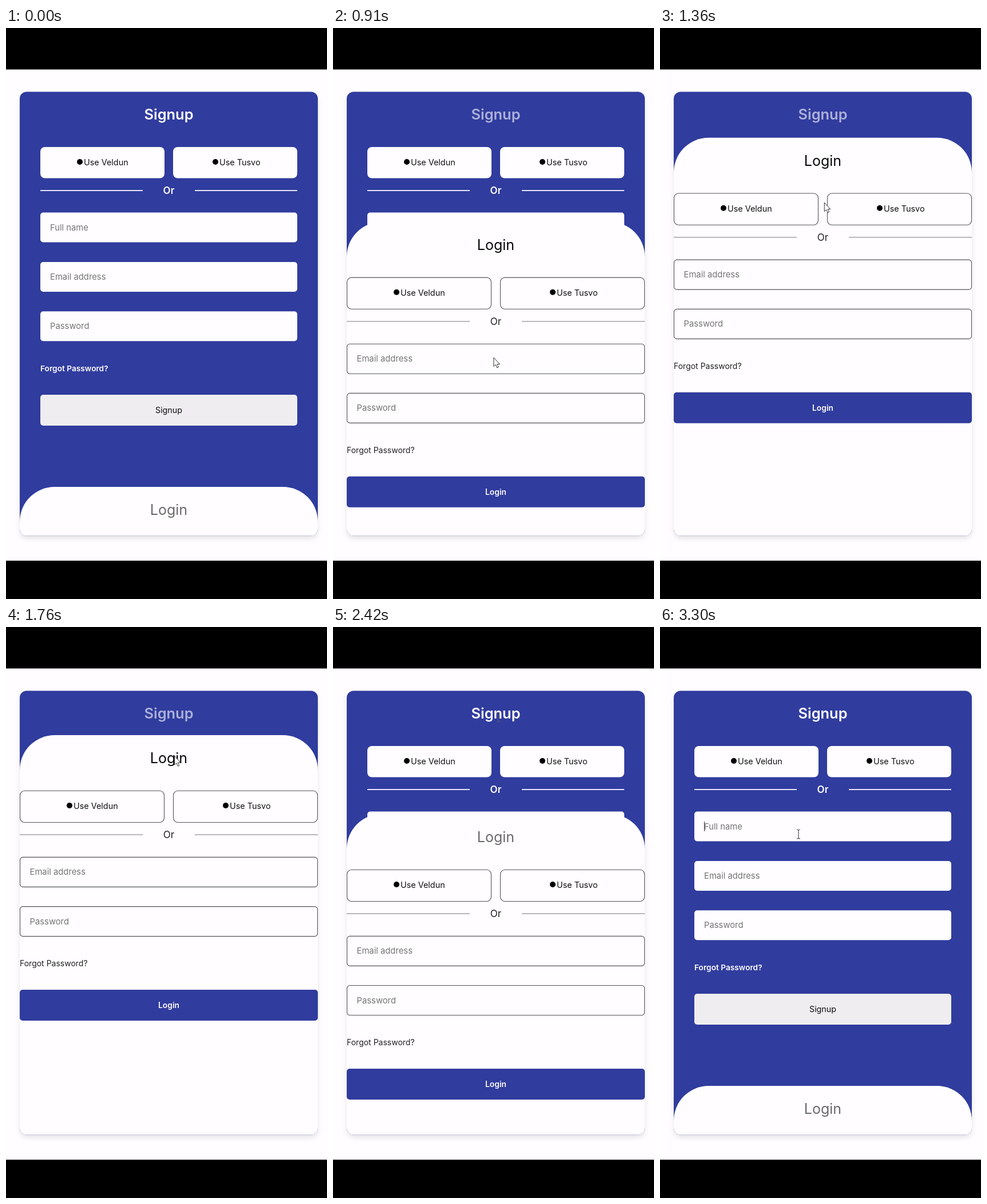
An HTML page for the animation above (3.33 s loop, 561 by 998 pixels).

```html
<!DOCTYPE html>
<html lang="en">
<head>
<meta charset="utf-8">
<title>Signup and login card</title>
<style>
  html, body { margin: 0; width: 100%; height: 100%; overflow: hidden; background: #fffdff; }
  svg { display: block; width: 100%; height: 100%; font-family: Inter, "Open Sans", sans-serif; }
  .shadow { filter: drop-shadow(0 5px 5px rgba(0, 0, 0, .11)); }
</style>
</head>
<body>
<svg id="stage" viewBox="0 0 561 998"></svg>
<script>
const LOOP = 3330;
const SLIDE = 990, OPEN = 459, CLOSE = 2254;   // panel slide length and the two clicks
const LOW = 802, HIGH = 189;                   // panel top, closed and open
const BLUE = '#303c9e', WHITE = '#fffdff', HINT = '#757575';

const text = (x, y, size, fill, str, extra = '') =>
  `<text x="${x}" y="${y}" font-size="${size}" fill="${fill}" ${extra}>${str}</text>`;
const mid = (y, size, fill, str, weight = 400, id = '') =>
  text(284.5, y, size, fill, str, `text-anchor="middle" font-weight="${weight}" id="${id}"`);
const box = (x, y, w, h, r, style) =>
  `<rect x="${x}" y="${y}" width="${w}" height="${h}" rx="${r}" ${style}/>`;
const rule = (x1, x2, y, style) => `<path d="M${x1} ${y}H${x2}" ${style}/>`;
const provider = (x, y, name) =>
  `<circle cx="${x + 5}" cy="${y - 6}" r="5"/>` + text(x + 12, y, 14.4, '#111', 'Use ' + name);
const field = (x, y, w, hint, style) =>
  box(x, y, w, 52, 5, style) + text(x + 17, y + 31, 14.8, HINT, hint);

const plain = `fill="${WHITE}"`;
const outline = `fill="${WHITE}" stroke="#55535a" stroke-width="1.1"`;
const pale = `stroke="${WHITE}" stroke-width="1.7"`;
const grey = 'stroke="#a3a1a6" stroke-width="1.4"';

const signup =
  mid(160, 25.4, WHITE, 'Signup', 600, 'signupTitle') +
  box(60, 208, 217, 54.5, 8, plain) + provider(124, 240, 'Veldun') +
  box(292, 208, 217, 54.5, 8, plain) + provider(361, 240, 'Tusvo') +
  rule(60, 239, 284.2, pale) + rule(330, 509, 284.2, pale) + mid(290, 17, WHITE, 'Or', 600) +
  field(60, 322.5, 449, 'Full name', plain) +
  field(60, 409, 449, 'Email address', plain) +
  field(60, 495.2, 449, 'Password', plain) +
  text(60, 600, 13.7, WHITE, 'Forgot Password?', 'font-weight="600"') +
  box(60, 641, 449, 54, 5, 'fill="#efedef"') + mid(672.5, 14.3, '#111', 'Signup') +
  '<path id="caret" d="M77.5 340V357" stroke="#333"/>';

const login =
  box(24, 0, 521, 900, 61, plain) +
  mid(49, 25, '#080808', 'Login', 400, 'loginTitle') +
  box(24.5, 97.3, 252, 55.2, 8, outline) + provider(106, 129, 'Veldun') +
  box(292.5, 97.3, 252, 55.2, 8, outline) + provider(379, 129, 'Tusvo') +
  rule(24, 239, 174, grey) + rule(330, 545, 174, grey) + mid(180, 17, '#222', 'Or') +
  field(24.5, 213.4, 520, 'Email address', outline) +
  field(24.5, 299.6, 520, 'Password', outline) +
  text(24, 404, 14, '#222', 'Forgot Password?') +
  box(24, 445, 521, 54, 5, `fill="${BLUE}"`) + mid(477, 13.8, WHITE, 'Login', 600);

const shapes = {
  arrow: '<path d="M.5 .5V16L4 12.8 6.3 18.3 8.8 17.2 6.5 12H11Z" fill="#fff" stroke="#333"/>',
  beam: '<path d="M-3-8Q0-8 0-6Q0-8 3-8M0-6V6M-3 8Q0 8 0 6Q0 8 3 8" fill="none" stroke="#55535a" stroke-width="1.2"/>',
  hand: '<path d="M0 1.5Q1.6-1 3 1.5V8Q5 6.5 6 8.6 8 7.5 8.8 9.6 11 9 11 11.5V15Q11 18 9 20V22H1.5V20L-4 13.5Q-4.5 10.5-2 11.5L0 13.5Z" fill="#fff" stroke="#222" stroke-width="1.1"/>'
};

const stage = document.getElementById('stage');
stage.innerHTML =
  '<clipPath id="card">' + box(24, 111.5, 521, 776, 12, '') + '</clipPath>' +
  box(0, 0, 561, 998, 0, plain) +
  box(24.5, 112, 520, 775, 12, `fill="${WHITE}" class="shadow"`) +
  '<g clip-path="url(#card)">' + box(24, 111, 521, 777, 0, `fill="${BLUE}"`) +
  signup + '<g id="panel">' + login + '</g></g>' +
  box(0, 0, 561, 72.5, 0, '') + box(0, 931, 561, 67, 0, '') +
  '<g id="pointer">' +
  Object.entries(shapes).map(([k, s]) => `<g id="${k}">${s}</g>`).join('') + '</g>';

const $ = id => document.getElementById(id);

// Pointer stops: time, x, y
const path = [
  [180, 296, 856], [440, 280, 850], [640, 276, 866], [1150, 284, 335], [1760, 294, 225],
  [2180, 289, 158], [2420, 289, 158], [2700, 296, 269], [3150, 242, 362], [LOOP, 242, 362]
];
// Pointer shape from the given time on
const looks = [[0, ''], [180, 'hand'], [540, 'arrow'], [2060, 'beam'],
               [2500, 'hand'], [2790, 'arrow'], [2910, 'beam']];

// The standard CSS "ease" curve
function ease(p) {
  if (p <= 0) return 0;
  if (p >= 1) return 1;
  const curve = (a, b, u) => 3 * a * u * (1 - u) ** 2 + 3 * b * u * u * (1 - u) + u ** 3;
  let lo = 0, hi = 1;
  for (let i = 0; i < 24; i++) {
    const u = (lo + hi) / 2;
    if (curve(.25, .25, u) < p) lo = u; else hi = u;
  }
  return curve(.1, 1, lo);
}

function pointerAt(t) {
  if (t <= path[0][0]) return path[0].slice(1);
  const i = path.findIndex(p => p[0] >= t);
  const [t0, x0, y0] = path[i - 1], [t1, x1, y1] = path[i];
  const k = (t - t0) / (t1 - t0), s = k * k * (3 - 2 * k);
  return [x0 + (x1 - x0) * s, y0 + (y1 - y0) * s];
}

function draw(t) {
  const shown = ease((t - OPEN) / SLIDE) - ease((t - CLOSE) / SLIDE);
  const open = t >= OPEN && t < CLOSE;
  $('panel').setAttribute('transform', `translate(0 ${LOW + (HIGH - LOW) * shown})`);
  $('signupTitle').setAttribute('opacity', open ? .6 : 1);
  $('loginTitle').setAttribute('opacity', open ? 1 : .6);
  $('caret').setAttribute('opacity', t >= 3180 ? 1 : 0);
  const look = looks.filter(l => l[0] <= t).pop()[1];
  for (const k in shapes) $(k).setAttribute('display', k === look ? 'inline' : 'none');
  $('pointer').setAttribute('transform', `translate(${pointerAt(t)})`);
}

const start = performance.now();
function tick() {
  draw((performance.now() - start) % LOOP);
  requestAnimationFrame(tick);
}
tick();
</script>
</body>
</html>
```
